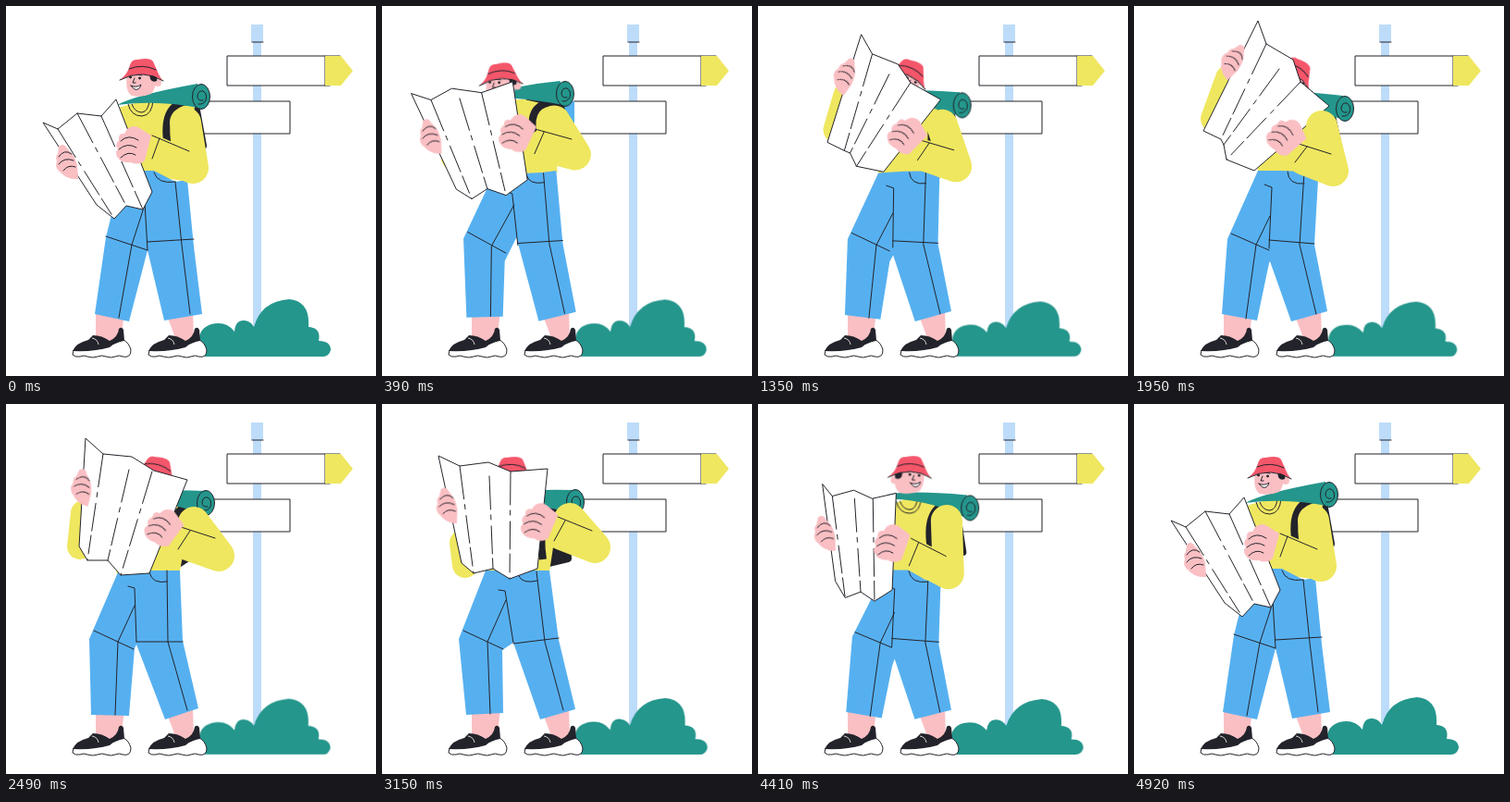
Animation, 400 px wide and 400 px high, one loop 4950 ms. Source, as an HTML page without scripts:

```html
<!DOCTYPE html>
<html lang="en">
<head>
<meta charset="utf-8">
<title>Hiker with a map</title>
<style>
html,body{margin:0;width:100%;height:100%;overflow:hidden;background:#fff}
svg{display:block;width:100%;height:100%}
:root{--ink:#23232b;--yellow:#efe75f;--blue:#56b0f0;--skin:#fabfc3;--red:#f4566a;--green:#24968c}
.ink{fill:none;stroke:var(--ink);stroke-width:1;stroke-linecap:round;stroke-linejoin:round}
.paper{fill:#fff;stroke:var(--ink);stroke-width:1;stroke-linejoin:round}
.arm{fill:none;stroke:var(--yellow);stroke-width:34;stroke-linecap:round;stroke-linejoin:round}
.black{fill:var(--ink)}.yellow{fill:var(--yellow)}.blue{fill:var(--blue)}
.skin{fill:var(--skin)}.red{fill:var(--red)}.green{fill:var(--green)}
#map,#folds,#pants,#creases,#torso,#pack,#strap,#tube,#roll,#armL,#armR,#cuff,#head,#face,#handL,#handR,#collar,#bush{
  animation:4.95s cubic-bezier(.4,.1,.6,.9) infinite}
#map{animation-name:map}#folds{animation-name:folds;stroke-dasharray:36 6 5 7 30 5 20 6}
#pants{animation-name:pants}#creases{animation-name:creases}
#torso{animation-name:torso}
#pack{animation-name:pack;stroke:var(--ink);stroke-width:8;stroke-linejoin:round}
#strap{animation-name:strap;fill:none;stroke:var(--ink);stroke-width:8}
#tube{animation-name:tube}#roll{animation-name:roll}
#armL{animation-name:armL;stroke-width:28}#armR{animation-name:armR}#cuff{animation-name:cuff}
#head{animation-name:head;transform-origin:147px 70px}
#collar{animation-name:collar}
#face{animation-name:face}
#hair{animation:hair 4.95s step-end infinite;transform-origin:147px 80px}
#handL{animation-name:handL;transform-origin:66px 168px}
#handR{animation-name:handR;transform-origin:138px 150px}
#bush{animation-name:bush;transform-origin:272px 379px}

/* poses: look left, raise map, tilt it, swing back, read, look right */
@keyframes map{
0%,1%,98%,100%{d:path("M40 126L56 133L77 116L103 119L119 101L158 201L148 220L130 216L117 230L98 215Z")}
11%,16%{d:path("M29 85L52 92L75 81L109 86L148 76L157 184L130 200L109 192L91 202L75 193Z")}
32%,41%{d:path("M134 16L143 41L172 58L180 82L211 108L130 178L100 166L97 150L94 144L75 135Z")}
50.3%{d:path("M86 37L105 54L136 57L160 72L196 82L155 183L124 185L110 169L88 169L79 154Z")}
58%,65.5%{d:path("M61 56L84 67L115 63L139 73L179 70L168 178L138 189L120 178L99 183L86 172Z")}
75%,85%{d:path("M79 74L88 89L112 86L130 97L159 95L141 201L119 211L105 199L87 203L79 184Z")}}
@keyframes folds{
0%,1%,98%,100%{d:path("M56 133L117 230M77 116L130 216M103 119L148 220")}
11%,16%{d:path("M52 92L91 202M86 95L109 192M109 86L130 200")}
32%,41%{d:path("M143 41L94 144M157 68L97 150M180 82L100 166")}
50.3%{d:path("M105 54L88 169M133 71L110 169M158 73L124 185")}
58%,65.5%{d:path("M84 67L99 183M116 78L120 178M139 73L138 189")}
75%,85%{d:path("M88 89L87 203M113 98L105 199M131 97L119 211")}}
@keyframes pants{
0%,1%,98%,100%{d:path("M126 178L108 250L96 333L133 341L145 295L153 264L171 340L212 333L203 260L196 188L183 190L160 178Z")}
11%,16%{d:path("M116 190L82 252L90 338L130 334L129 270L143 246L169 341L209 330L193 255L186 175L170 177L150 182Z")}
32%,41%{d:path("M134 178L101 252L95 333L133 340L146 278L147 276L170 341L209 330L195 258L199 188L184 179L160 178Z")}
50.3%{d:path("M121 182L90 254L92 336L133 337L139 264L141 260L172 341L208 329L191 256L188 180L172 180L150 180Z")}
58%,65.5%{d:path("M112 180L83 254L91 336L131 334L130 266L142 258L171 341L209 330L191 255L181 180L167 180L150 180Z")}
75%,85%{d:path("M142 180L100 252L95 333L134 339L145 280L146 279L169 341L208 330L193 260L198 195L180 190L164 180Z")}}
@keyframes creases{
0%,1%,98%,100%{d:path("M149 218L136 258L122 337M108 249L153 264M146 208L150 212L153 264M183 190L190 258L199 333M153 255L203 252M160 180Q164 193 183 190")}
11%,16%{d:path("M141 214L113 260L116 335M88 243L128 268M130 198L138 200L145 257M172 178L178 256L197 332M145 257L193 254M155 184Q158 194 173 191")}
32%,41%{d:path("M147 227L132 258L121 338M105 246L146 264M141 193L149 196L146 262M184 180L179 258L197 333M146 253L195 257M166 179Q167 194 184 192")}
50.3%{d:path("M139 218L121 257L118 336M95 245L138 265M132 197L139 199L141 257M174 180L175 257L196 331M141 257L191 257M155 182Q158 195 174 192")}
58%,65.5%{d:path("M134 212L114 257L117 335M88 245L131 265M126 201L133 202L142 258M167 181L176 257L196 331M142 259L191 253M148 186Q152 195 168 191")}
75%,85%{d:path("M147 228L131 258L121 338M104 246L142 263M140 194L147 196L142 262M184 192L178 258L196 333M142 253L193 259M164 181Q166 195 183 193")}}
@keyframes torso{
0%,1%,98%,100%{d:path("M128 108L165 98L204 108L198 190L130 180L122 110Z")}
11%,16%{d:path("M105 100L150 102L180 108L187 176L118 195L95 120Z")}
32%,41%{d:path("M150 100L190 105L214 120L199 190L134 179L125 120Z")}
50.3%{d:path("M125 100L175 100L200 112L188 181L120 184L105 115Z")}
58%,65.5%{d:path("M110 95L165 95L192 110L181 181L112 184L95 115Z")}
75%,85%{d:path("M152 108L172 98L213 110L198 196L142 182L140 115Z")}}
@keyframes pack{
0%,1%,98%,100%{d:path("M178 102L204 102L213 151L190 155Z")}
11%,16%{d:path("M154 103L188 102L193 125L160 150Z")}
32%,41%{d:path("M196 110L212 110L220 146L195 150Z")}
50.3%{d:path("M182 108L204 110L206 160L188 172Z")}
58%,65.5%{d:path("M175 108L198 110L201 167L180 172Z")}
75%,85%{d:path("M190 108L216 108L224 163L205 168Z")}}
@keyframes strap{
0%,1%,98%,100%{d:path("M204 102Q166 102 175 152")}
11%,16%{d:path("M190 106Q154 100 160 135")}
32%,41%{d:path("M214 112Q194 118 195 150")}
50.3%{d:path("M204 109Q176 110 182 150")}
58%,65.5%{d:path("M196 109Q166 114 174 168")}
75%,85%{d:path("M218 108Q180 108 192 165")}}
@keyframes tube{
0%,1%,98%,100%{d:path("M120 107Q140 96 207 84L213 111Q165 101 120 107Z")}
11%,16%{d:path("M100 95Q150 82 188 80L198 107Q150 98 100 95Z")}
32%,41%{d:path("M150 90Q180 92 226 97L230 124Q190 112 150 95Z")}
50.3%{d:path("M140 95Q180 92 214 94L217 120Q180 108 140 100Z")}
58%,65.5%{d:path("M130 95Q170 92 206 93L210 119Q170 110 130 100Z")}
75%,85%{d:path("M147 95Q170 92 232 103L236 131Q190 102 147 102Z")}}
@keyframes roll{
0%,1%,98%,100%{transform:translate(211px,98px)}
11%,16%{transform:translate(194px,94px)}
32%,41%{transform:translate(228px,111px)}
50.3%{transform:translate(216px,107px)}
58%,65.5%{transform:translate(209px,106px)}
75%,85%{transform:translate(235px,117px)}}
@keyframes armL{
0%,1%,98%,100%{d:path("M128 130L118 165L98 170")}
11%,16%{d:path("M100 130L79 178L72 162")}
32%,41%{d:path("M130 140L86 122L102 78")}
50.3%{d:path("M110 130L80 154L84 118")}
58%,65.5%{d:path("M110 130L90 174L87 150")}
75%,85%{d:path("M130 130L115 165L98 145")}}
@keyframes armR{
0%,1%,98%,100%{d:path("M194 126L202 175L162 158")}
11%,16%{d:path("M184 124L211 156L176 149")}
32%,41%{d:path("M203 130L215 178L184 166")}
50.3%{d:path("M203 128L230 164L193 151")}
58%,65.5%{d:path("M203 124L230 155L194 141")}
75%,85%{d:path("M207 126L207 186L174 167")}}
@keyframes cuff{
0%,1%,98%,100%{d:path("M198 157L158 140M166 143L158 165")}
11%,16%{d:path("M207 140L168 131M178 134L167 158")}
32%,41%{d:path("M213 160L178 149M187 152L174 169")}
50.3%{d:path("M226 145L189 133M199 137L186 157")}
58%,65.5%{d:path("M227 137L190 122M198 126L186 148")}
75%,85%{d:path("M205 167L168 147M176 152L165 178")}}
@keyframes head{
0%,1%,98%,100%{transform:none}
11%,16%{transform:translate(-24px,6px) rotate(-5deg)}
32%,41%{transform:translate(28px,0) rotate(30deg)}
50.3%{transform:translate(16px,0) rotate(14deg)}
58%,65.5%{transform:translate(-7px,0) rotate(2deg)}
75%,85%{transform:translate(23px,-1px)}}
@keyframes collar{
0%,1%,98%,100%{transform:none}
11%,16%{transform:translate(-24px,6px)}
32%,41%{transform:translate(12px,0)}
50.3%{transform:translate(0,0)}
58%,65.5%{transform:translate(-7px,0)}
75%,85%{transform:translate(23px,-1px)}}
@keyframes face{0%,16%,98%,100%{transform:none}32%,85%{transform:translateX(16px)}}
@keyframes hair{0%,91.5%,100%{transform:none}24%{transform:scaleX(-1)}}
@keyframes handL{
0%,1%,98%,100%{transform:none}
11%,16%{transform:translate(-17px,-36px) rotate(2deg)}
32%,41%{transform:translate(42px,-109px) rotate(50deg)}
50.3%{transform:translate(17px,-79px) rotate(18deg)}
58%,65.5%{transform:translate(5px,-59px) rotate(6deg)}
75%,85%{transform:translate(9px,-38px) rotate(4deg)}}
@keyframes handR{
0%,1%,98%,100%{transform:none}
11%,16%{transform:translate(11px,-17px) rotate(14deg)}
32%,41%{transform:translate(27px,-9px) rotate(34deg)}
50.3%{transform:translate(33px,-17px) rotate(22deg)}
58%,65.5%{transform:translate(32px,-23px) rotate(8deg)}
75%,85%{transform:translate(9px,0) rotate(6deg)}}
@keyframes bush{
0%,1%,98%,100%{transform:none}
32%,41%{transform:scale(.978,.957)}
58%,65.5%{transform:scale(1.01,.985)}
75%,85%{transform:skewX(-1deg) scale(1.01,.957)}}
</style>
</head>
<body>
<svg viewBox="0 0 400 400">
  <defs>
    <g id="shoe">
      <path class="paper" d="M73 372L72 377Q75 380 80 379Q84 377 88 379Q94 381 99 379Q104 377 108 379Q114 381 118 379Q123 377 126 379Q135 381 135 372Q133 364 127 361L104 370Z"/>
      <path class="black" d="M72 373Q76 364 89 361L94 356Q104 356 112 362Q121 358 122 349Q125 346 127 350L128 362Q118 363 112 369Q96 374 72 373Z"/>
      <path d="M93 359Q99 360 100 366" fill="none" stroke="#fff" stroke-width=".8"/>
    </g>
  </defs>

  <g fill="#bddcfa"><path d="M267 39H276V350H267ZM265 20H278V39H265Z"/></g>
  <path class="ink" d="M266 39H278"/>
  <path class="paper" d="M239 54H345V86H239ZM207 103H307V138H207Z"/>
  <path class="ink" d="M345 54H361M345 86H350"/>
  <path class="yellow" d="M345 54H362L375 70L362 86H345Z"/>
  <path class="blue" d="M208 103H190L178 120L190 138H208Z"/>
  <path id="bush" class="green" d="M212 379Q202 350 222 344Q238 340 247 352Q248 339 258 340Q265 341 268 347Q276 319 306 317Q329 319 327 347Q341 348 338 362Q351 362 351 372Q349 379 343 379Z"/>

  <path class="skin" d="M97 330H128L124 364H97ZM174 335L202 328L203 362L185 364Z"/>
  <use href="#shoe"/><use href="#shoe" x="82"/>

  <path id="armL" class="arm"/>
  <path id="pack" class="black"/>
  <path id="torso" class="yellow"/>
  <path id="pants" class="blue"/>
  <path id="creases" class="ink"/>
  <path id="strap"/>
  <path id="collar" class="ink" d="M132 106Q135 119 147 119Q158 118 159 102M136 106Q139 115 147 115Q154 114 155 102"/>
  <path id="tube" class="green"/>
  <g id="roll">
    <ellipse class="green" rx="9.5" ry="13.5" stroke="#23232b"/>
    <path class="ink" d="M2 4Q-4 5 -4 -1Q-3 -7 2 -6Q7 -3 5 4Q2 9 -3 8"/>
  </g>

  <g id="head">
    <path class="skin" d="M131 74Q128 92 136 97Q147 99 157 95Q163 88 162 74Z"/>
    <g id="hair">
      <circle class="skin" cx="164" cy="83" r="4"/>
      <path class="black" d="M155 73L164 74L163 81Q158 83 156 79Z"/>
    </g>
    <g id="face" class="ink">
      <path d="M132 74L136 73M142 74L147 75M139 78L137 83L140 83"/>
      <path d="M135 86Q141 89 146 85Q144 92 139 90Z" fill="#fff"/>
      <circle class="black" cx="134.500" cy="77" r="1"/><circle class="black" cx="144.500" cy="78" r="1"/>
    </g>
    <path class="red" d="M123 80Q132 73 134 64Q136 57 142 58Q156 55 159 60L163 69Q166 77 170 81Q148 67 123 80Z"/>
    <path class="ink" d="M133 68Q148 62 162 69M123 80Q148 67 170 81" stroke-width=".8"/>
  </g>

  <path id="map" class="paper"/>
  <path id="folds" class="ink"/>

  <g id="handL">
    <path class="skin" d="M57 152Q62 147 66 154Q74 160 77 172L78 187Q66 188 59 180Q52 175 55 168Q53 162 56 160Z"/>
    <path class="ink" d="M57 163Q63 154 71 160M57 171Q63 163 73 167M62 178Q67 171 75 174"/>
  </g>
  <path id="armR" class="arm"/>
  <path id="cuff" class="ink"/>
  <g id="handR">
    <path class="skin" d="M131 133Q138 127 146 133L157 140L150 167Q143 173 135 169Q124 170 121 164Q117 159 121 155Q117 149 122 145Q121 137 128 138Z"/>
    <path class="ink" d="M124 146Q132 138 143 145M122 155Q131 147 141 153M124 164Q132 156 140 161"/>
  </g>
</svg>
</body>
</html>
```
